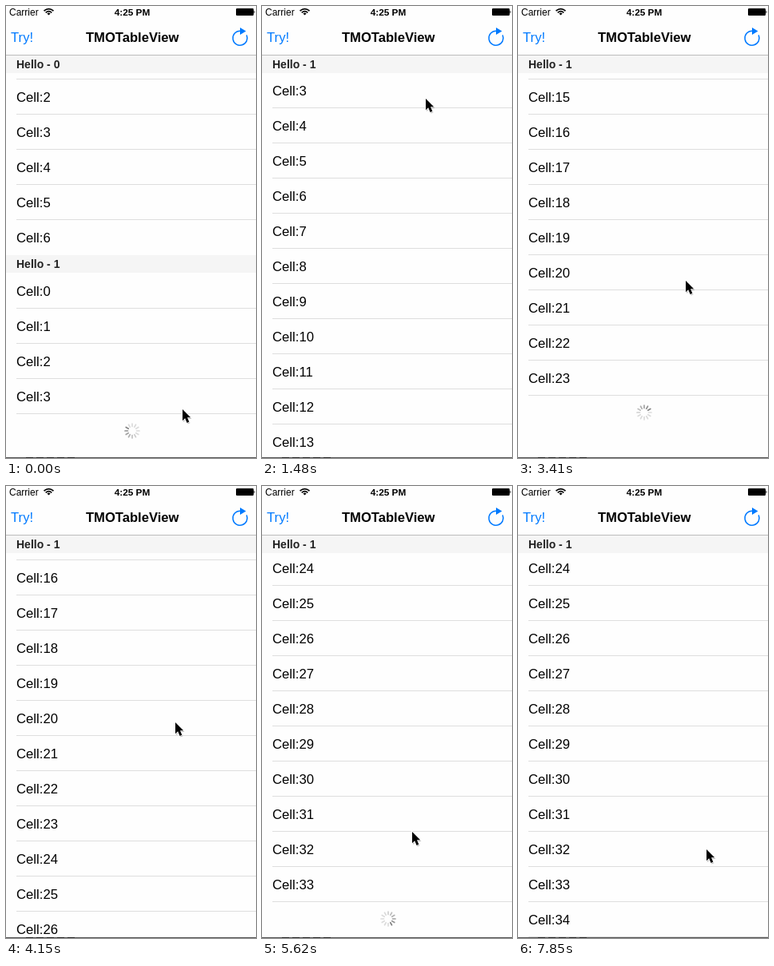
Recreate the animation shown at these times as an HTML page. Size 313 by 566 pixels, loop 8000 ms.

```html
<!DOCTYPE html>
<html lang="en">
<head>
<meta charset="utf-8">
<title>Table view</title>
<style>
  html, body { margin: 0; width: 313px; height: 566px; overflow: hidden; background: #fefefe; }
  svg { display: block; font-family: "Liberation Sans", Arial, sans-serif; }
  .cell { font-size: 16.7px; }
  .head { font-size: 14px; font-weight: 700; fill: #222; }
  .blue { fill: #007aff; }
</style>
</head>
<body>
<svg width="313" height="566" viewBox="0 0 313 566">
  <rect width="313" height="566" fill="#fefefe"/>
  <g id="list"></g>
  <g id="spinner" stroke="#777" stroke-width="1.7" stroke-linecap="round"></g>
  <g id="head0" class="head"><rect width="313" height="22" fill="#f5f5f5"/><text x="13" y="16">Hello - 0</text></g>
  <g id="head1" class="head"><rect width="313" height="22" fill="#f5f5f5"/><text x="13" y="16">Hello - 1</text></g>

  <rect width="313" height="61" fill="#fefefe"/>
  <rect y="61" width="313" height="1" fill="#bcbcbc"/>
  <text x="4" y="12" font-size="12">Carrier</text>
  <g fill="none" stroke="#000" stroke-width="1.7">
    <path d="M47.5 6.2Q53.5 .9 59.5 6.2M49.7 8.4Q53.5 5 57.3 8.4"/>
    <path d="M51.4 9.4Q53.5 7.8 55.6 9.4L53.5 11.6Z" fill="#000" stroke="none"/>
  </g>
  <text x="158" y="12" font-size="11.8" font-weight="700" text-anchor="middle">4:25 PM</text>
  <rect x="288" y="3" width="22" height="9" rx="1.2"/>
  <path d="M310.5 5.5Q312.5 7.5 310.5 9.5Z"/>
  <text class="blue" x="6" y="45" font-size="16.7">Try!</text>
  <text x="158.2" y="45" font-size="16.6" font-weight="700" text-anchor="middle">TMOTableView</text>
  <path d="M301.2 36.4A9 9 0 1 1 293 31.2" fill="none" stroke="#007aff" stroke-width="1.5"/>
  <path class="blue" d="M293 27L300.5 31.5L293 36Z"/>

  <rect y="565" width="313" height="1" fill="#555"/>
  <path d="M25 565.5h62" stroke="#222" stroke-dasharray="9 4"/>

  <g id="cursor">
    <path d="M1 2V16L4.2 13L6.5 18.5L9.5 17.2L7.2 12H11.5Z" opacity=".25"/>
    <path d="M0 0V14.2L3.2 11.3L5.6 16.9L8.3 15.7L6 10.3H10.2Z" stroke="#fff" stroke-width="1.6" paint-order="stroke"/>
  </g>
</svg>
<script>
const LOOP = 8000, STEP = 148, LAST = 53;
const ROW = 44, PAGE = 10, BAR = 62, REST = 344;
const FLICK = 1114, PULL = 33, PULL_TIME = 300;

const loads = [592, 2055, 3850, 6650]; // ten more rows arrive
const flicks = loads.slice(0, -1);     // each scrolls down one page
const pulls = [-209, 3404, 5040];      // drags past the end of the list

// Turning points of the hand: [ms, x, y]
const hand = [
  [0, 221, 505], [592, 219, 510], [1480, 205, 116], [2055, 212, 380], [2368, 211, 295],
  [2700, 209, 160], [3404, 210, 344], [3850, 212, 420], [4440, 213, 170],
  [5032, 215, 309], [5624, 188, 433], [5772, 189, 481], [6650, 189, 481],
  [7696, 188, 344], [7844, 236, 455]
];

const el = id => document.getElementById(id);
const sum = (list, f) => list.reduce((total, v) => total + f(v), 0);
const move = (id, x, y) => el(id).setAttribute("transform", `translate(${x} ${y})`);

function ease(u) {
  u = Math.min(1, Math.max(0, u));
  return u * u * (3 - 2 * u);
}

function listTop(t) {
  const scrolled = sum(flicks, s => ease((t - s) / FLICK)) * PAGE * ROW;
  const pulled = sum(pulls, p => Math.max(0, 1 - Math.abs(t - p) / PULL_TIME)) * PULL;
  return Math.round(REST - scrolled - pulled);
}

function handAt(t) {
  const i = Math.max(1, hand.findIndex(p => p[0] >= t));
  const [t0, x0, y0] = hand[i - 1], [t1, x1, y1] = hand[i];
  const u = ease((t - t0) / (t1 - t0));
  return [Math.round(x0 + (x1 - x0) * u), Math.round(y0 + (y1 - y0) * u)];
}

function add(parent, name, attrs, text = "") {
  const node = document.createElementNS("http://www.w3.org/2000/svg", name);
  for (const key in attrs) node.setAttribute(key, attrs[key]);
  node.textContent = text;
  return parent.appendChild(node);
}

function addRow(n, top, line) {
  const row = add(el("list"), "g", { transform: `translate(0 ${top})` });
  add(row, "text", { class: "cell", x: 13, y: 29 }, "Cell:" + n);
  if (line) add(row, "rect", { x: 13, y: ROW, width: 300, height: 1, fill: "#dedede" });
  return row;
}

for (let n = 0; n < 7; n++) addRow(n, -23 - (7 - n) * ROW, n < 6);
const rows = Array.from({ length: 44 }, (_, n) => addRow(n, n * ROW, true));
const spokes = Array.from({ length: 12 }, (_, n) =>
  add(el("spinner"), "line", { y1: -5.5, y2: -9, transform: `rotate(${n * 30})` }));

function draw(time) {
  // The picture advances in steps, as in a screen recording.
  const t = Math.min(LAST, Math.floor((time + 10) / STEP)) * STEP;
  const top = listTop(t);
  const count = 4 + PAGE * loads.filter(s => t >= s).length;

  move("list", 0, top);
  rows.forEach((row, n) => row.setAttribute("display", n < count ? "inline" : "none"));
  move("head0", 0, Math.min(BAR, top - 44));
  move("head1", 0, Math.max(BAR, top - 22));
  move("cursor", ...handAt(t));

  move("spinner", 158, top + count * ROW + 22);
  const lead = Math.floor(t * 0.012 + 10.1);
  spokes.forEach((spoke, n) => {
    const age = (lead - n + 12) % 12;
    spoke.setAttribute("opacity", Math.max(0.25, 0.9 - age * 0.11));
  });
}

const start = performance.now();
function tick() {
  draw((performance.now() - start) % LOOP);
  requestAnimationFrame(tick);
}
tick();
</script>
</body>
</html>
```
